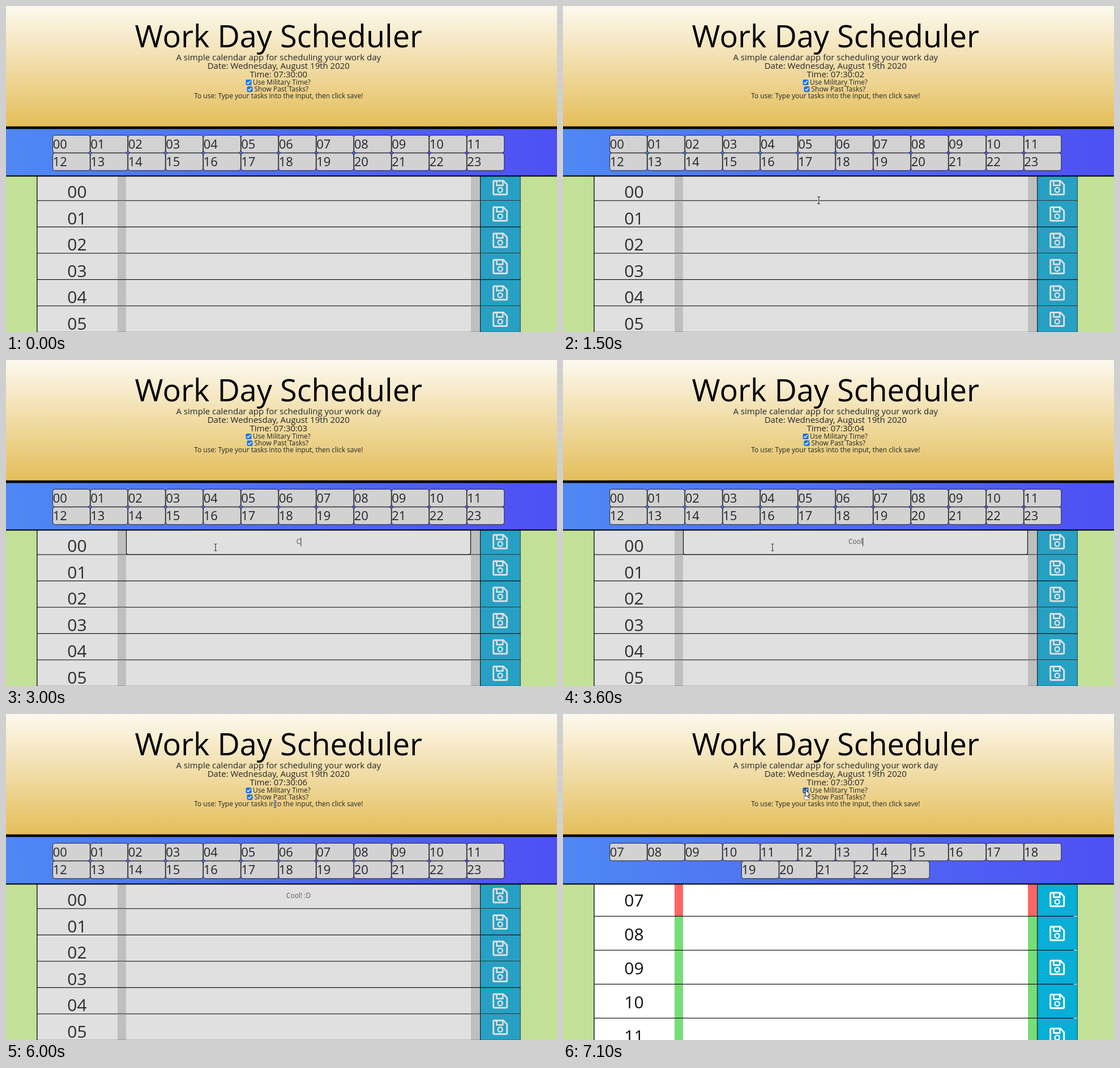
These frames come from a looping animation (973 by 576 pixels, 7.2 s). An HTML page:

```html
<!DOCTYPE html>
<html lang="en">
<head>
<meta charset="utf-8">
<title>Work Day Scheduler</title>
<style>
  html, body { margin: 0; width: 100%; height: 100%; overflow: hidden; }
  svg { display: block; width: 973px; height: 576px; font-family: "Open Sans", sans-serif; fill: #212529; }
  .mid { text-anchor: middle; }
  .lead { font-size: 15px; }
  .small { font-size: 12px; }
  .hour { font-size: 30px; }
  .slot { font-size: 22px; }
</style>
</head>
<body>
<svg viewBox="0 0 973 576">
  <defs>
    <linearGradient id="sand" x2="0" y2="1">
      <stop stop-color="#fdf9ef"/><stop offset="1" stop-color="#e4be5a"/>
    </linearGradient>
    <linearGradient id="blue" gradientUnits="userSpaceOnUse" x1="0" y1="290" x2="973" y2="230">
      <stop stop-color="#4f88f3"/><stop offset="1" stop-color="#4e50f4"/>
    </linearGradient>
    <radialGradient id="meadow" gradientUnits="userSpaceOnUse" r="1" gradientTransform="translate(486 576) scale(900 450)">
      <stop offset=".45" stop-color="#a6ecb6"/><stop offset=".85" stop-color="#c3e097"/>
    </radialGradient>
    <g id="disk" fill="none">
      <path d="M-10.5-12H5.5L12-5.5V10.5a1.5 1.5 0 0 1-1.5 1.5H-10.5a1.5 1.5 0 0 1-1.5-1.5V-10.5a1.5 1.5 0 0 1 1.5-1.5Z" stroke-width="2.9"/>
      <path d="M-6.2-12V-4.2H4.6V-12" stroke-width="2.6"/>
      <circle cy="4" r="4.1" stroke-width="2.4"/>
    </g>
  </defs>

  <rect y="300" width="973" height="276" fill="url(#meadow)"/>
  <g id="allRows"></g>
  <g id="laterRows"></g>

  <g id="task">
    <rect id="focus" x="212.5" y="299.5" width="608" height="44" rx="3" fill="none" stroke="#111" stroke-width="1.2"/>
    <text id="typed" class="small mid" x="516.5" y="325" fill="#555a5f"></text>
    <rect id="caret" y="314" width="1" height="15" fill="#222"/>
  </g>

  <rect width="973" height="213" fill="url(#sand)"/>
  <rect y="217" width="973" height="83" fill="url(#blue)"/>
  <rect y="212.7" width="973" height="4.6" fill="#000"/>
  <rect y="299.4" width="973" height="2" fill="#000"/>

  <text class="mid" x="481.3" y="73" font-size="54" fill="#000">Work Day Scheduler</text>
  <g class="mid lead">
    <text x="481.3" y="96.3">A simple calendar app for scheduling your work day</text>
    <text x="481.3" y="111.3">Date: Wednesday, August 19th 2020</text>
    <text id="clock" x="481.3" y="126.3"></text>
  </g>
  <g class="small">
    <text x="436" y="139">Use Military Time?</text>
    <text x="438.5" y="151">Show Past Tasks?</text>
    <text class="mid" x="481.3" y="163">To use: Type your tasks into the input, then click save!</text>
  </g>
  <rect id="military" x="423.5" y="130" width="10" height="10" rx="2"/>
  <path d="M425.6 135.2l2 2 3.9-4.6" fill="none" stroke="#fff" stroke-width="1.5"/>
  <rect id="past" x="426" y="142.5" width="9" height="9" rx="1.5"/>
  <path id="tick" d="M427.7 147.2l2 2 3.7-4.4" fill="none" stroke="#fff" stroke-width="1.5"/>

  <g id="allSlots"></g>
  <g id="laterSlots"></g>

  <g id="mouse">
    <path id="arrow" d="M0 0V12.2L2.8 9.6L4.8 14.2L6.9 13.3L5 8.8H8.6Z" fill="#fff" stroke="#111"/>
    <g id="beam" fill="none">
      <path id="bar" d="M-2.5-6H-1Q0-6 0-5Q0-6 1-6H2.5M0-5V5M-2.5 6H-1Q0 6 0 5Q0 6 1 6H2.5" stroke="#eee" stroke-width="2.6"/>
      <use href="#bar"/>
      <path d="M-2.5-6H-1Q0-6 0-5Q0-6 1-6H2.5M0-5V5M-2.5 6H-1Q0 6 0 5Q0 6 1 6H2.5" stroke="#222" stroke-width="1.1"/>
    </g>
  </g>
</svg>
<script>
const $ = id => document.getElementById(id);
const pad = n => String(n).padStart(2, "0");
const show = (id, on) => $(id).setAttribute("visibility", on ? "inherit" : "hidden");
const rect = (x, y, w, h, fill) => `<rect x="${x}" y="${y}" width="${w}" height="${h}" fill="${fill}"/>`;

const LOOP = 7200, CLICK = 1700, SAVE = 5600, HIDE = 6500;
const TEXT = "Cool! :D";
const KEYS = [3000, 3200, 3400, 3600, 3800, 4000, 4100, 4450];
const PATH = [
  [300, 980, 520], [700, 937, 444], [1000, 860, 405], [1600, 370, 331],
  [4800, 370, 331], [4900, 442, 321], [5300, 868, 321], [5700, 868, 321],
  [6000, 475, 159], [6300, 430, 147], [6500, 430, 147], [6800, 428, 134], [LOOP, 428, 134]
];

function rows(first, height, past) {
  const face = past ? "#e0e0e0" : "#fff";
  let out = "";
  for (let i = 0; 298 + i * height < 576; i++) {
    const y = 298 + i * height, end = y + height;
    const band = past ? "#bfbfbf" : i ? "#77dd77" : "#ff6663";
    out += rect(55, y, 853, height, face)
      + rect(197, y, 15, height, band) + rect(821, y, 16.5, height, band)
      + rect(837.5, y, 71, height, past ? "#27a0c3" : "#07aed6")
      + rect(837, y, 1.2, height, "#123") + rect(907.8, y, 1, height, "#245")
      + rect(55, end - 1.2, past ? 854 : 847, 1.5, "#111")
      + (past ? "" : rect(902, end - 1, 6, 1, "#d8eef4"))
      + `<text class="hour mid" x="125.5" y="${y + (past ? 41 : 41.5)}" fill="${past ? "#2a2c2e" : "#111"}">${pad(first + i)}</text>`
      + `<use href="#disk" x="872.7" y="${y + height / 2 - .2}" stroke="${face}"/>`;
  }
  return out + rect(54.2, 300, 1.4, 276, "#111");
}

function slots(first) {
  let out = "";
  for (let h = first; h < 24; h++) {
    const i = h - first, line = Math.floor(i / 12);
    const count = Math.min(12, 24 - first - line * 12);
    const x = 481.2 - count * 33.25 + (i % 12) * 66.5, y = 228.3 + line * 31.5;
    out += `<rect x="${x + .4}" y="${y}" width="65.8" height="31" rx="4" fill="#d3d2d3" stroke="#222"/>`
      + `<text class="slot" x="${x + .5}" y="${y + 23.6}">${pad(h)}</text>`;
  }
  return out;
}

function mouseAt(t) {
  const i = PATH.findIndex(p => p[0] > t);
  const [t0, x0, y0] = PATH[i - 1], [t1, x1, y1] = PATH[i];
  const k = (t - t0) / (t1 - t0);
  return [x0 + (x1 - x0) * k, y0 + (y1 - y0) * k];
}

$("allRows").innerHTML = rows(0, 46.5, true);
$("laterRows").innerHTML = rows(7, 60, false);
$("allSlots").innerHTML = slots(0);
$("laterSlots").innerHTML = slots(7);

function draw(t) {
  const hidden = t >= HIDE;
  for (const part of ["Rows", "Slots"]) {
    show("all" + part, !hidden);
    show("later" + part, hidden);
  }
  $("clock").textContent = "Time: 07:30:" + pad(Math.floor((t + 500) / 1000));

  const focused = t >= CLICK && t < SAVE;
  const keys = KEYS.filter(k => k <= t);
  const blink = Math.floor((t - (keys.at(-1) || CLICK)) / 500) % 2;
  $("typed").textContent = TEXT.slice(0, keys.length);
  $("caret").setAttribute("x", 516.5 + $("typed").getComputedTextLength() / 2);
  show("task", !hidden);
  show("focus", focused && !hidden);
  show("caret", focused && !blink);

  $("military").setAttribute("fill", t >= 6800 ? "#1759b8" : "#1a75e8");
  $("past").setAttribute("fill", hidden ? "#fff" : "#1a75e8");
  $("past").setAttribute("stroke", hidden ? "#777" : "#1a75e8");
  show("tick", !hidden);

  show("mouse", t >= 300);
  if (t >= 300) {
    const [x, y] = mouseAt(t);
    const overInput = x > 212 && x < 821 && y > 301;
    const overText = x > 437 && x < 662 && y > 83 && y < 165;
    $("mouse").setAttribute("transform", `translate(${x} ${y})`);
    show("beam", overInput || overText);
    show("arrow", !overInput && !overText);
  }
}

const start = performance.now();
function frame() {
  const t = (performance.now() - start) % LOOP;
  draw(Math.floor(t / 100) * 100); // ten steps a second
  requestAnimationFrame(frame);
}
frame();
</script>
</body>
</html>
```
